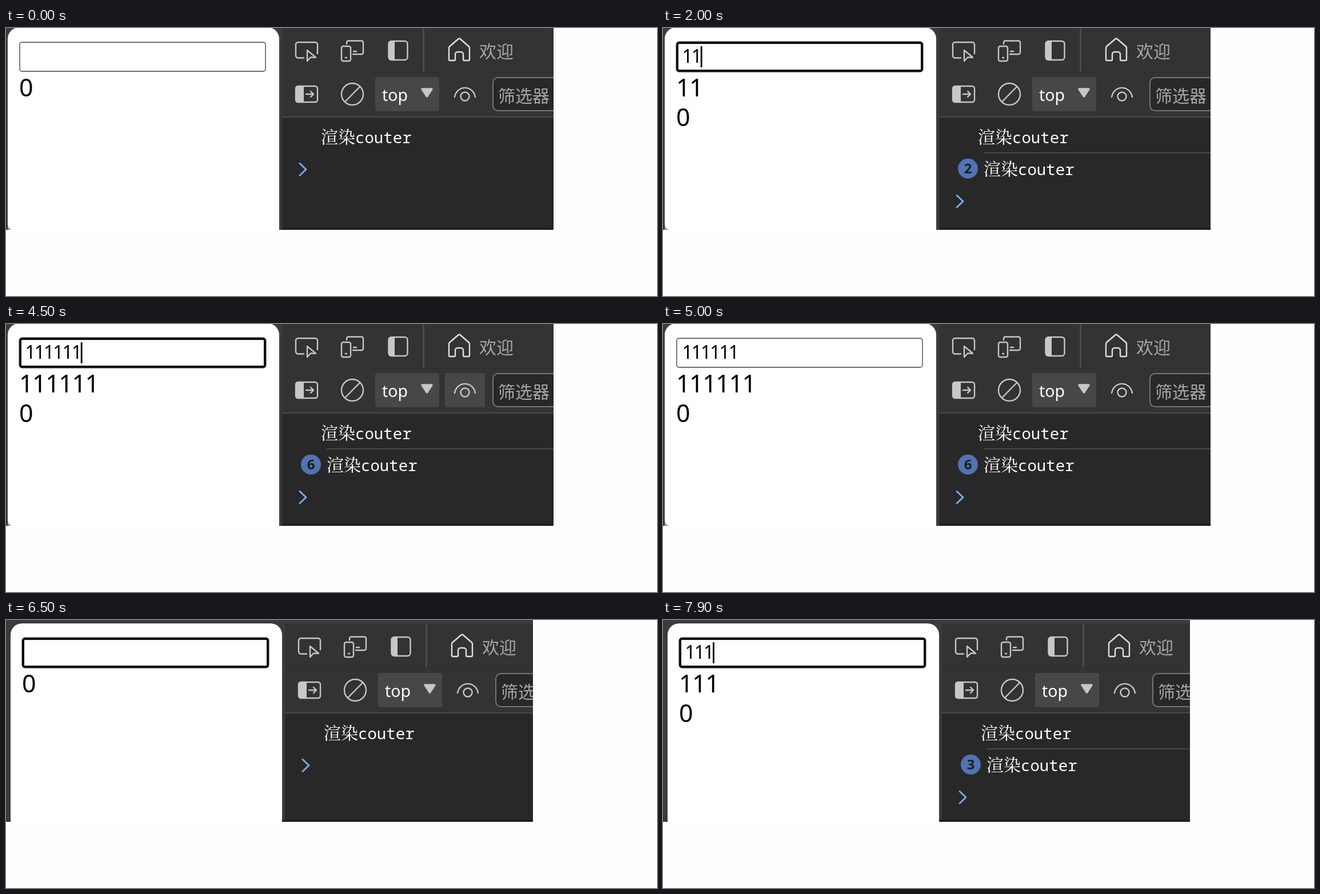
An HTML page for the animation above (8 s loop, 1139 by 470 pixels).

```html
<!DOCTYPE html>
<html lang="zh-CN">
<head>
<meta charset="utf-8">
<title>Render counter</title>
<style>
  html, body { margin: 0; width: 100%; height: 100%; overflow: hidden; background: #fefefe; }
  svg { display: block; width: 1139px; height: 470px; }
  text { white-space: pre; }
  .page { font: 43px "Noto Sans", "Open Sans", sans-serif; letter-spacing: -1.5px; }
  .typed { font: 32px "Noto Sans", "Open Sans", sans-serif; letter-spacing: -2.05px; }
  .ui { font: 30px "Noto Sans CJK SC", "Noto Sans CJK", sans-serif; fill: #a6a6a6; }
  .top { font: 28.5px "Noto Sans", "Open Sans", sans-serif; fill: #fff; }
  .log { font: 500 27.4px "Noto Sans Mono", monospace; fill: #fff; }
  .log .cjk { font: 30px "Noto Serif CJK SC", "Noto Sans CJK SC", "Noto Sans CJK", serif; }
  .count { font: bold 24px "Noto Sans", "Open Sans", sans-serif; fill: #1d1d1d; text-anchor: middle; }
  .icons { fill: none; stroke: #c7c7c7; stroke-width: 2.4; stroke-linejoin: round; stroke-linecap: round; }
  .icons .solid { fill: #c7c7c7; stroke: none; }
</style>
</head>
<body>
<svg viewBox="0 0 1139 470">
  <defs>
    <clipPath id="window"><rect id="windowClip" width="958" height="354"/></clipPath>
  </defs>
  <g clip-path="url(#window)">
    <rect width="958" height="354" fill="#3b3b3b"/>
    <g id="scene">
      <!-- Web page -->
      <rect x="3" y="340" width="14" height="16" fill="#999"/>
      <path d="M3 19a20 20 0 0 1 20-20H458a20 20 0 0 1 20 20V355H15a12 12 0 0 1-12-12Z" fill="#fff"/>
      <rect id="field" fill="#fff"/>
      <text id="typed" class="typed" x="33.5" y="61"></text>
      <rect id="caret" y="32" width="2.8" height="37"/>
      <text id="echo" class="page" x="23" y="119.5"></text>
      <text id="zero" class="page" x="23">0</text>

      <!-- Developer tools -->
      <rect x="483" width="480" height="156" fill="#333"/>
      <rect x="483" y="77" width="480" height="1" fill="#2b2b2b"/>
      <rect x="729" width="3" height="77" fill="#4a4a4a"/>
      <rect x="483" y="157" width="480" height="200" fill="#282828"/>
      <rect x="483" y="155" width="480" height="2" fill="#4a4a4a"/>
      <rect x="646" y="86" width="112" height="60" rx="4" fill="#474747"/>
      <rect id="eyeHover" x="768" y="86" width="70" height="60" rx="4" fill="#474747"/>
      <rect x="852" y="87" width="140" height="58" rx="9" fill="#282828" stroke="#757575" stroke-width="2"/>
      <text class="ui" x="828" y="51.5">欢迎</text>
      <text class="ui" x="861" y="130">筛选器</text>
      <text class="top" x="658" y="128">top</text>

      <g class="icons">
        <path d="M521 52.5H511a4 4 0 0 1-4-4V29a4 4 0 0 1 4-4H541a4 4 0 0 1 4 4V45"/>
        <path d="M527 39V58L533 51.5H542Z"/>
        <path d="M596 28V25.500a3 3 0 0 1 3-3H622a3 3 0 0 1 3 3V43a3 3 0 0 1-3 3H607M608 41H613M594 52H596"/>
        <rect x="587" y="32" width="16" height="26" rx="3"/>
        <rect x="669.500" y="23" width="33" height="33" rx="5"/>
        <path class="solid" d="M680 23H674a5 5 0 0 0-5 5V51a5 5 0 0 0 5 5H680Z"/>
        <path d="M775 35a3 3 0 0 1 1-2.500L791 19.500a3 3 0 0 1 4 0L810 32.500a3 3 0 0 1 1 2.500V55a2 2 0 0 1-2 2H802a2 2 0 0 1-2-2V46a4 4 0 0 0-4-4H790a4 4 0 0 0-4 4V55a2 2 0 0 1-2 2H777a2 2 0 0 1-2-2Z" stroke="#e0e0e0"/>
        <rect x="507" y="102" width="38" height="28" rx="4"/>
        <path class="solid" d="M521 102H511a4 4 0 0 0-4 4V126a4 4 0 0 0 4 4H521Z"/>
        <path d="M525 116H538M533 111L538 116L533 121"/>
        <circle cx="606" cy="116" r="19"/>
        <path d="M593 129.500L619.500 102.500"/>
        <path d="M728 107H745L736.500 120Z" fill="#c7c7c7" stroke-width="3.500"/>
        <path d="M785 121C789 99.500 817 99.500 821 121"/>
        <circle cx="803" cy="120" r="7.500"/>
      </g>

      <!-- Console output -->
      <text class="log" x="551" y="202"><tspan class="cjk">渲染</tspan>couter</text>
      <g id="secondLog">
        <path id="logLine" stroke="#474747" stroke-width="2"/>
        <text id="logText" class="log" y="258"><tspan class="cjk">渲染</tspan>couter</text>
        <g id="badge">
          <circle cx="533.500" cy="246.500" r="17.500" fill="#5074b3"/>
          <text id="count" class="count" x="533.500" y="255"></text>
        </g>
      </g>
      <path id="prompt" d="M514 237.500L525 248L514 258.500" fill="none" stroke="#7cacf8" stroke-width="2.800" stroke-linecap="round" stroke-linejoin="round"/>
    </g>
    <rect x="483" y="350" width="480" height="4" fill="#202020"/>
  </g>
</svg>
<script>
const LOOP = 8000;
const CHAR_WIDTH = 16.25;
const el = id => document.getElementById(id);
const setAttrs = (id, attrs) => {
  for (const name in attrs) el(id).setAttribute(name, attrs[name]);
};
const show = (id, visible) => { el(id).style.display = visible ? "" : "none"; };

const idle = { moved: false, field: "normal", caret: false, typed: 0, logged: 0, eye: false };
const type = n => ({ typed: n, caret: true });
const typeAndLog = n => ({ ...type(n), logged: n });

// Each entry changes only the listed parts of the state.
const timeline = [
  [0, idle],
  [300, { field: "hover" }],
  [700, { field: "focus", caret: true }],
  [1200, { caret: false }],
  [1500, typeAndLog(1)],
  [1900, type(2)],
  [2000, { logged: 2 }],
  [2500, type(3)],
  [2600, { logged: 3 }],
  [3100, typeAndLog(4)],
  [3600, type(5)],
  [3700, { logged: 5 }],
  [4200, typeAndLog(6)],
  [4500, { eye: true }],
  [4600, { eye: false }],
  [4700, { caret: false }],
  [5000, { field: "normal" }],
  [5500, { ...idle, moved: true }],
  [5900, { field: "hover" }],
  [6000, { field: "focus", caret: true }],
  [6500, { caret: false }],
  [7000, typeAndLog(1)],
  [7400, typeAndLog(2)],
  [7900, typeAndLog(3)],
];

const thin = { x: 24, y: 25, width: 430, height: 51, rx: 4, "stroke-width": 1.8 };
const fieldStyles = {
  normal: { ...thin, stroke: "#707070" },
  hover: { ...thin, stroke: "#484848" },
  focus: { x: 24.8, y: 25.8, width: 428.4, height: 49.4, rx: 3.5, stroke: "#101010", "stroke-width": 4.4 },
};

function stateAt(time) {
  const past = timeline.filter(([start]) => start <= time);
  return Object.assign({}, ...past.map(([, change]) => change));
}

function draw(state) {
  const { typed, logged } = state;
  const digits = "1".repeat(typed);
  const logX = logged > 1 ? 561 : 551;

  setAttrs("windowClip", { width: state.moved ? 922 : 958 });
  setAttrs("scene", { transform: state.moved ? "translate(5 7)" : "translate(0 0)" });
  setAttrs("field", fieldStyles[state.field]);
  setAttrs("caret", { x: 33.3 + typed * CHAR_WIDTH });
  show("caret", state.caret);
  el("typed").textContent = el("echo").textContent = digits;
  setAttrs("zero", { y: typed ? 172 : 119.5 });

  show("eyeHover", state.eye);
  show("secondLog", logged > 0);
  show("badge", logged > 1);
  el("count").textContent = logged;
  setAttrs("logText", { x: logX });
  setAttrs("logLine", { d: `M${logX} 219H963` });
  setAttrs("prompt", { transform: `translate(0 ${logged ? 56 : 0})` });
}

const startTime = performance.now();
function tick() {
  draw(stateAt((performance.now() - startTime) % LOOP));
  requestAnimationFrame(tick);
}
tick();
</script>
</body>
</html>
```
